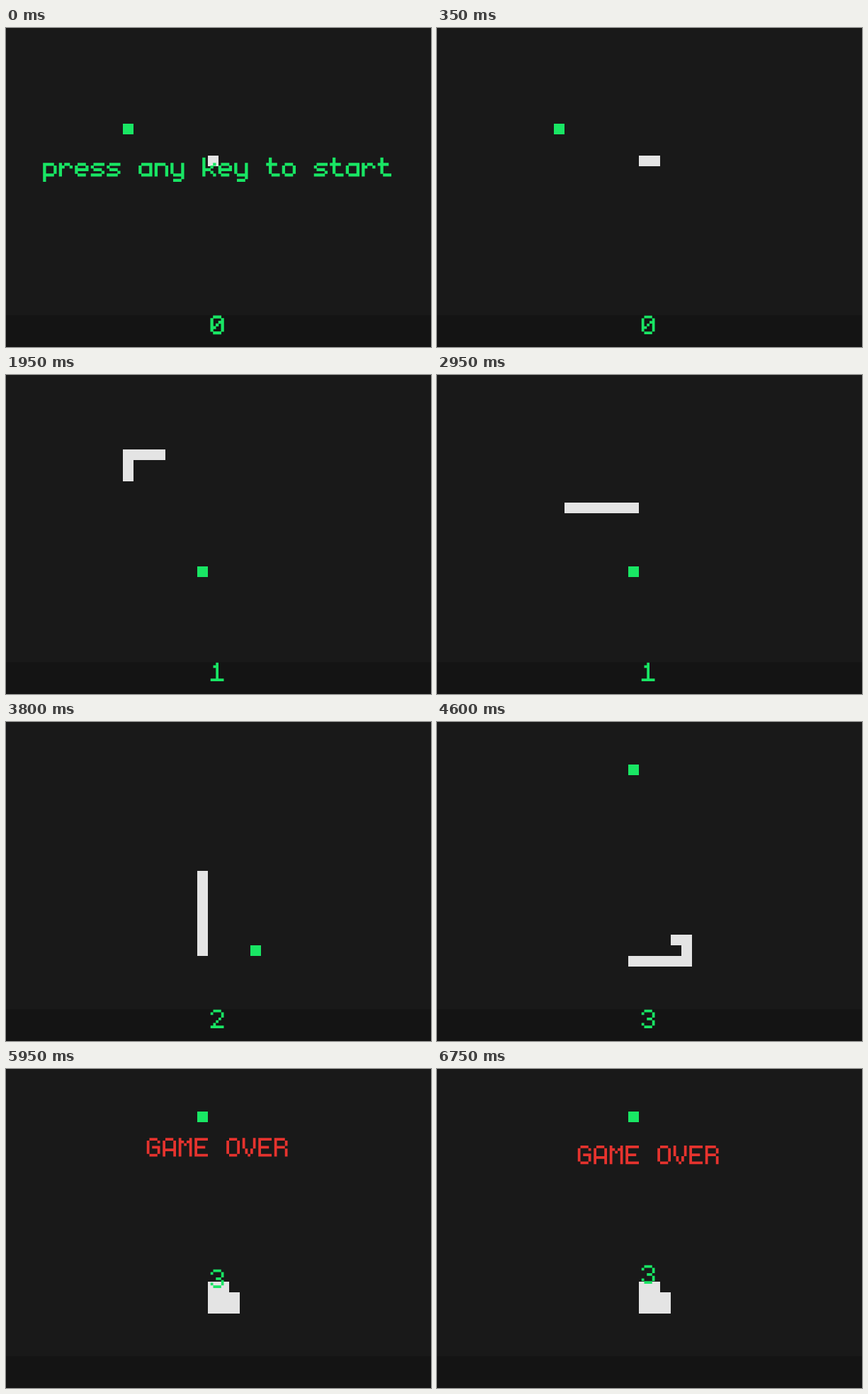
Animation of 600x450 px, one loop 10000 ms. Source, as an HTML page:

```html
<!DOCTYPE html>
<html lang="en">
<head>
<meta charset="utf-8">
<title>Snake</title>
<style>
  html, body { margin: 0; width: 100%; height: 100%; overflow: hidden; background: #191919; }
  svg { display: block; width: 100%; height: 100%; }
  .text { fill: none; stroke-linecap: square; }
</style>
</head>
<body>
<svg id="stage" viewBox="0 0 600 450">
  <rect width="600" height="450" fill="#191919"/>
  <rect y="405" width="600" height="45" fill="#141414"/>
  <path id="food" fill="#19e664"/>
  <path id="snake" fill="#e4e4e4"/>
  <g id="start" class="text" stroke="#19e664"/>
  <g id="over" class="text" stroke="#e6332e"/>
  <g id="score" class="text" stroke="#19e664"/>
</svg>
<script>
const LOOP = 10000, TICK = 50, CELL = 15, DOT = 3.75;
const START = 250, DEATH = 5550;
const $ = id => document.getElementById(id);

// Pixel letters as strokes on a grid five dots wide, baseline below row 6
const GLYPHS = {
  p: 'M0 2V8M1 2H3M4 3V5M1 6H3',
  r: 'M0 2V6M1 3h0M2 2H3M4 3h0',
  e: 'M1 2H3M0 3V5M4 3V4H1M1 6H3',
  s: 'M1 2H4M0 3h0M1 4H3M4 5h0M0 6H3',
  a: 'M1 2H4V6H1M0 3V5',
  n: 'M0 6V2H3M4 3V6',
  y: 'M0 2V5M1 6H4M4 2V7M1 8H3',
  k: 'M0 0V6M4 2h0M3 3h0M1 4H2M3 5h0M4 6h0',
  t: 'M1 0V5M0 2H3M2 6H4',
  o: 'M1 2H3M0 3V5M4 3V5M1 6H3',
  G: 'M1 0H3M4 1h0M0 1V5M2 3H4V5M1 6H3',
  A: 'M1 0H3M0 1V6M4 1V6M0 4H4',
  M: 'M0 0V6M4 0V6M1 1h0M2 2h0M3 1h0',
  E: 'M4 0H0V6H4M0 3H3',
  O: 'M1 0H3M0 1V5M4 1V5M1 6H3',
  V: 'M0 0V3M4 0V3M1 4V5M3 4V5M2 6h0',
  R: 'M0 6V0H3M4 1V2M0 3H3M4 4V6',
  0: 'M1 0H3M0 1V5M4 1V5M1 6H3M3 2h0M2 3h0M1 4h0',
  1: 'M2 0V6M1 1h0M0 6H4',
  2: 'M0 1h0M1 0H3M4 1V2M3 3h0M2 4h0M1 5h0M0 6H4',
  3: 'M0 1h0M1 0H3M4 1V2M2 3H3M4 4V5M1 6H3M0 5h0'
};

function write(group, text) {
  if (group.dataset.text === text) return;
  group.dataset.text = text;
  group.setAttribute('aria-label', text);
  group.innerHTML = [...text].map((c, i) =>
    c === ' ' ? '' : `<path transform="translate(${i * 6} 0)" d="${GLYPHS[c]}"/>`).join('');
}

// Centres a line of text with its top at y
function place(group, y) {
  const x = 300 - group.dataset.text.length * 3 * DOT;
  group.setAttribute('transform', `translate(${x} ${y}) scale(${DOT}) translate(.5 .5)`);
}

const show = (el, on) => el.setAttribute('visibility', on ? 'visible' : 'hidden');
const square = ([x, y]) => `M${x * CELL} ${y * CELL}h${CELL}v${CELL}h-${CELL}z`;

// Bursts of steps: first time, last time, count
const BURSTS = [
  [300, 400, 2], [550, 650, 3], [800, 1400, 8], [1550, 1650, 3], [1800, 2800, 12],
  [2950, 3000, 2], [3150, 3250, 3], [3400, 3450, 2], [3600, 3650, 2],
  [3800, 4200, 6], [4350, 4400, 2], [4550, 4650, 3], [4800, 5400, 8]
];
const snap = t => Math.floor(t / TICK + 1e-6) * TICK;
const times = BURSTS.flatMap(([from, to, count]) =>
  Array.from({ length: count }, (_, i) => snap(from + (to - from) * i / (count - 1))));

const DIRS = { R: [1, 0], L: [-1, 0], U: [0, -1], D: [0, 1] };
const trail = [[19, 12]];
for (const run of 'R2 U5 L10 D5 R7 D10 R5 U2 L4 D2 R2 U1 L1'.split(' ')) {
  const [dx, dy] = DIRS[run[0]];
  for (let i = 0; i < +run.slice(1); i++) {
    const [x, y] = trail[trail.length - 1];
    trail.push([x + dx, y + dy]);
  }
}

const foods = [[11, 9], [18, 18], [23, 21], [18, 4]];
const meals = foods.map(([fx, fy]) => trail.findIndex(([x, y]) => x === fx && y === fy))
  .filter(i => i >= 0);

const ease = (from, to, keep, t) => to + (from - to) * keep ** (Math.max(0, t) * 0.06);

function draw(now) {
  const t = snap(now % LOOP);
  const waiting = t < START, dead = t >= DEATH;
  const step = times.filter(s => s <= t).length;
  const score = meals.filter(m => m <= step).length;
  const grown = 6 + meals.filter(m => m < step).length - (dead ? 1 : 0);
  const body = trail.slice(Math.max(0, step + 1 - grown), step + 1);

  $('snake').setAttribute('d', body.map(square).join(''));
  $('food').setAttribute('d', square(foods[score]));

  show($('start'), waiting);
  show($('over'), dead);
  write($('score'), String(score));
  $('score').setAttribute('stroke-width', waiting ? 1.15 : 1);
  place($('score'), ease(405.75, 276.75, 0.88, t - DEATH));
  place($('over'), ease(-27, 108, 0.9, t - DEATH));
}

write($('start'), 'press any key to start');
write($('over'), 'GAME OVER');
$('start').setAttribute('stroke-width', 1.15);
place($('start'), 183);

const origin = performance.now();
function frame() {
  draw(performance.now() - origin);
  requestAnimationFrame(frame);
}
frame();
</script>
</body>
</html>
```
